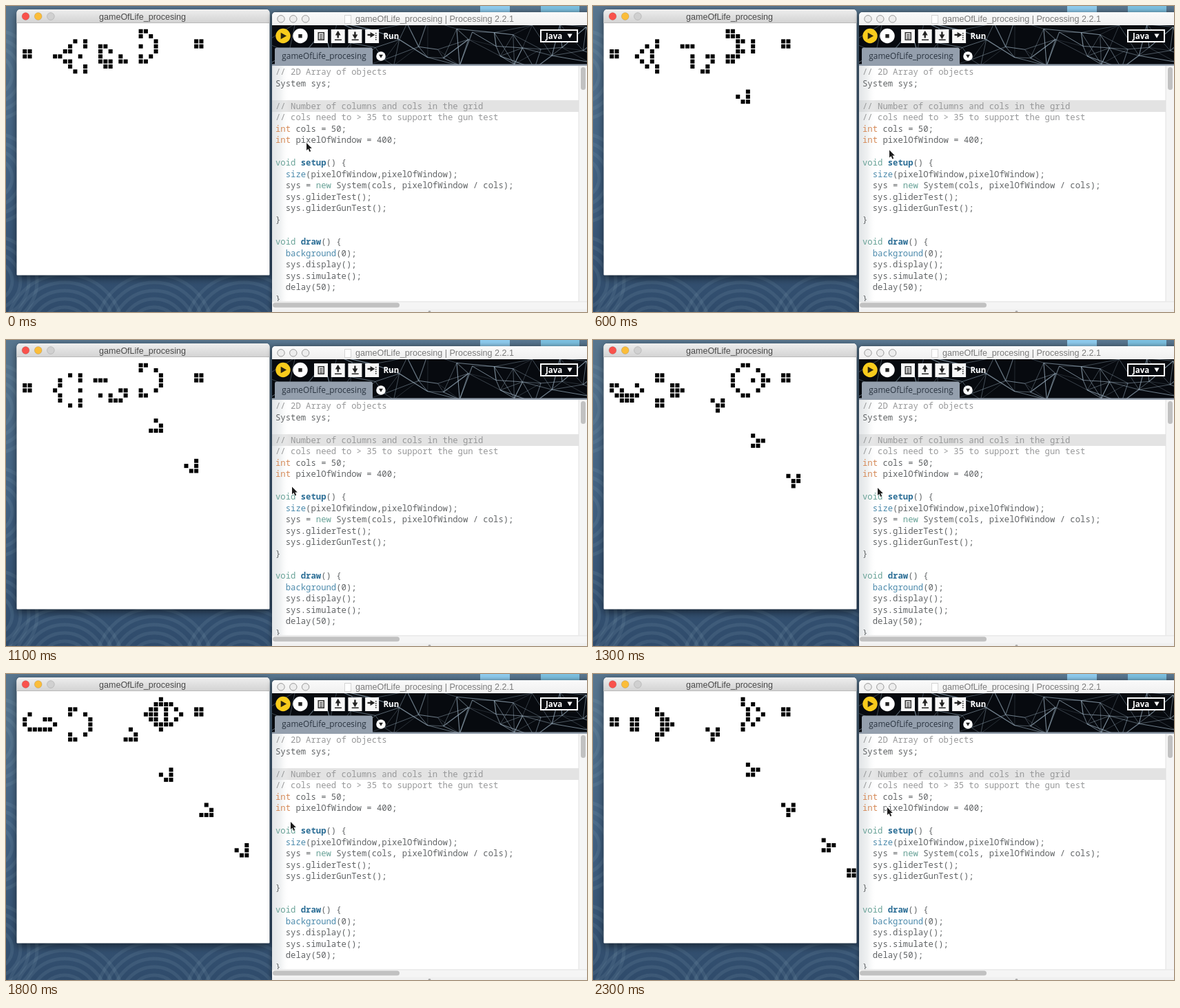
These frames come from a looping animation (843 by 445 pixels, 2.4 s). An HTML page with a canvas:

```html
<!DOCTYPE html>
<html lang="en">
<head>
<meta charset="utf-8">
<title>gameOfLife_procesing</title>
<style>
html, body { margin: 0; width: 100%; height: 100%; overflow: hidden; background: #35557a; }
canvas { display: block; }
</style>
</head>
<body>
<canvas id="stage" width="843" height="445"></canvas>
<script>
const W = 843, H = 445, STEP = 100, STEPS = 24;
const stage = document.getElementById('stage').getContext('2d');
const SANS = '"Liberation Sans", Arial, sans-serif';
const UI = '"Open Sans", "Noto Sans", sans-serif';
const MONO = '"Noto Sans Mono", "DejaVu Sans Mono", monospace';

// ---------- Game of Life ----------
// 50 x 50 cells inside a border that stays dead
const N = 52, CELL = 366 / 50, LEFT = 16, TOP = 25.5;
// Gosper glider gun, run-length encoded
const GUN = '24bo$22bobo$12b2o6b2o12b2o$11bo3bo4b2o12b2o$2o8bo5bo3b2o$' +
  '2o8bo3bob2o4bobo$10bo5bo7bo$11bo3bo$12b2o!';

function decode(rle, left, top) {
  const grid = new Uint8Array(N * N);
  let c = left, r = top;
  for (const [, count, mark] of rle.matchAll(/(\d*)([bo$])/g)) {
    const n = Number(count || 1);
    if (mark === '$') { r += n; c = left; continue; }
    if (mark === 'o') grid.fill(1, r * N + c, r * N + c + n);
    c += n;
  }
  return grid;
}

function evolve(grid) {
  const next = new Uint8Array(N * N);
  for (let r = 1; r < N - 1; r++) {
    for (let c = 1; c < N - 1; c++) {
      const i = r * N + c;
      let n = -grid[i];
      for (let d = -1; d <= 1; d++) {
        n += grid[i + d - N] + grid[i + d] + grid[i + d + N];
      }
      next[i] = n === 3 || (n === 2 && grid[i]) ? 1 : 0;
    }
  }
  return next;
}

// a steady run with a slight wobble in speed
const generation = step => Math.round(7.4 + 5.6 * step + 0.35 * Math.sin(step * 0.436));

function buildSteps() {
  let grid = decode(GUN, 2, 2), gen = 0;
  return Array.from({ length: STEPS }, (_, s) => {
    for (; gen < generation(s); gen++) grid = evolve(grid);
    return grid;
  });
}

// ---------- drawing helpers ----------
const back = document.createElement('canvas');
back.width = W;
back.height = H;
const g = back.getContext('2d');

function box(x, y, w, h, fill) {
  g.fillStyle = fill;
  g.fillRect(x, y, w, h);
}
function fade(x0, y0, x1, y1, ...stops) {
  const f = g.createLinearGradient(x0, y0, x1, y1);
  stops.forEach((c, i) => f.addColorStop(i / (stops.length - 1), c));
  return f;
}
function rounded(x, y, w, h, radii, fill) {
  g.beginPath();
  g.roundRect(x, y, w, h, radii);
  g.fillStyle = fill;
  g.fill();
}
function disc(x, y, r, fill, line) {
  g.beginPath();
  g.arc(x, y, r, 0, Math.PI * 2);
  g.fillStyle = fill;
  g.fill();
  if (line) {
    g.strokeStyle = line;
    g.lineWidth = 1;
    g.stroke();
  }
}
function triangle(x, y, size, turn, fill) {
  g.beginPath();
  for (let k = 0; k < 3; k++) {
    const a = turn + k * Math.PI * 2 / 3;
    g.lineTo(x + size * Math.cos(a), y + size * Math.sin(a));
  }
  g.fillStyle = fill;
  g.fill();
}
function text(str, x, y, font, fill, align = 'left') {
  g.font = font;
  g.fillStyle = fill;
  g.textAlign = align;
  g.fillText(str, x, y);
}
function seeded(seed) {
  return () => (seed = (seed * 16807) % 2147483647) / 2147483647;
}

// ---------- scene ----------
const DOWN = Math.PI / 2, UP = -DOWN, RIGHT = 0;

function ripples(x, y, size) {
  g.lineWidth = 5;
  g.strokeStyle = 'rgba(150,175,195,0.13)';
  for (let r = size; r > 8; r -= 12) {
    g.beginPath();
    g.arc(x, y, r, 0, Math.PI * 2);
    g.stroke();
  }
}

function drawDesktop() {
  box(0, 0, W, H, fade(0, 0, 0, H, '#58768f', '#426283', '#2f4b6b'));
  for (let k = 0; k < 3; k++) {
    ripples(85 + k * 130, 475, 85);
    ripples(-20, 100 + k * 150, 65);
  }
  box(688, 0, 43, 9, '#8ecbee');
  box(776, 0, 56, 9, '#7cc0e0');
}

function drawSketchWindow() {
  g.save();
  g.shadowColor = 'rgba(0,0,0,0.55)';
  g.shadowBlur = 12;
  g.shadowOffsetY = 4;
  rounded(15.5, 5, 367, 386.5, [5, 5, 1, 1], '#fff');
  g.restore();
  rounded(15.5, 5, 367, 20, [5, 5, 0, 0], fade(0, 5, 0, 25, '#eeeeee', '#d2d2d2'));
  box(15.5, 24, 367, 1, '#b9b9b9');
  ['#f9524c', '#fbbd3a', '#d0d0d0'].forEach((c, i) => disc(28.5 + i * 18.2, 15, 5.4, c, 'rgba(0,0,0,0.12)'));
  text('gameOfLife_procesing', 198, 19.5, '12.5px ' + SANS, '#4a4a4a', 'center');
}

function drawMesh() {
  const rnd = seeded(77), nodes = [];
  for (let x = 370; x < 870; x += 32) {
    for (let y = 20; y < 90; y += 26) nodes.push([x + rnd() * 28, y + rnd() * 22]);
  }
  g.save();
  g.beginPath();
  g.rect(386, 28, 457, 57);
  g.clip();
  nodes.forEach(([x, y], i) => nodes.slice(i + 1).forEach(([u, v]) => {
    if (Math.hypot(x - u, y - v) > 56 || rnd() < 0.35) return;
    g.beginPath();
    g.moveTo(x, y);
    g.lineTo(u, v);
    g.lineWidth = 0.6 + rnd() * 0.7;
    g.strokeStyle = `rgba(165,186,202,${0.25 + rnd() * 0.5})`;
    g.stroke();
  }));
  g.restore();
}

function arrowIcon(x, turn) {
  const reach = 4.5;
  triangle(x + reach * Math.cos(turn) * 0.4, 42 + reach * Math.sin(turn) * 0.4, 4.5, turn, '#222');
  g.beginPath();
  g.moveTo(x, 42);
  g.lineTo(x - reach * Math.cos(turn), 42 - reach * Math.sin(turn));
  g.strokeStyle = '#222';
  g.lineWidth = 2.4;
  g.stroke();
}

function drawToolbar() {
  box(386, 28, 457, 58, '#070a0f');
  drawMesh();
  disc(402, 43.5, 10.7, '#f8cb1c');
  triangle(401.5, 43.5, 5.6, RIGHT, '#2b2410');
  disc(427, 43.5, 10.7, '#fff');
  box(424.3, 41, 5.4, 5.4, '#222');
  for (let i = 0; i < 4; i++) box(447 + i * 24.7, 34, 20, 20, '#f7f7f7');
  box(452.5, 38, 9.5, 12, '#333');
  box(454, 39.5, 6.5, 9, '#f7f7f7');
  for (let y = 41; y < 48; y += 2) box(455, y, 4.5, 1, '#333');
  arrowIcon(481.7, UP);
  arrowIcon(506.4, DOWN);
  arrowIcon(529, RIGHT);
  for (const x of [477, 501.7]) box(x, 48.5, 10, 1.5, '#222');
  for (let y = 39; y < 50; y += 3) box(536, y, 1.5, 1.5, '#222');
  text('Run', 547.5, 47.5, 'bold 11.5px ' + UI, '#fff');

  box(775, 34, 55, 19, '#fff');
  box(777, 36, 51, 15, '#070a0f');
  text('Java', 783, 47.5, 'bold 11.5px ' + UI, '#fff');
  triangle(818, 42.5, 4.2, DOWN, '#fff');

  rounded(390, 60.5, 142, 26, [3, 3, 0, 0], '#949fad');
  box(386, 84.5, 457, 2.5, '#949fad');
  text('gameOfLife_procesing', 461.5, 77, '11.8px ' + UI, '#2a3440', 'center');
  disc(544, 73, 6.8, '#fff');
  triangle(544, 72.4, 3.4, DOWN, '#222');
}

const INK = '#616466', GREY = '#979899', TYPE = '#d58a58', TEAL = '#68a297',
  HEAD = '#2a6d95', CALL = '#4a89ab';
const CODE = [
  [['// 2D Array of objects', GREY]],
  [['System sys;']],
  [],
  [['// Number of columns and cols in the grid', GREY]],
  [['// cols need to > 35 to support the gun test', GREY]],
  [['int', TYPE], [' cols = 50;']],
  [['int', TYPE], [' pixelOfWindow = 400;']],
  [],
  [['void ', TEAL], ['setup', HEAD, 'bold '], ['() {']],
  [['  size', CALL], ['(pixelOfWindow,pixelOfWindow);']],
  [['  sys = '], ['new', TEAL], [' System(cols, pixelOfWindow / cols);']],
  [['  sys.gliderTest();']],
  [['  sys.gliderGunTest();']],
  [['}']],
  [],
  [['void ', TEAL], ['draw', HEAD, 'bold '], ['() {']],
  [['  background', CALL], ['(0);']],
  [['  sys.display();']],
  [['  sys.simulate();']],
  [['  delay(50);']],
  [['}']]
];

function drawCode() {
  g.save();
  g.beginPath();
  g.rect(386, 87, 445, 343);
  g.clip();
  CODE.forEach((line, i) => {
    let x = 391;
    for (const [str, fill = INK, weight = ''] of line) {
      text(str, x, 100.4 + i * 16.47, weight + '12.25px ' + MONO, fill);
      x += g.measureText(str).width;
    }
  });
  g.restore();
}

function drawEditor() {
  g.save();
  g.shadowColor = 'rgba(0,0,0,0.5)';
  g.shadowBlur = 7;
  rounded(386, 9, 470, 440, [5, 0, 0, 0], '#fff');
  g.restore();
  rounded(386, 9, 470, 19, [5, 0, 0, 0], fade(0, 9, 0, 28, '#fafafa', '#f0f0f0'));
  for (let i = 0; i < 3; i++) disc(399 + i * 17.8, 18.8, 5.2, '#ededed', '#999');
  box(491, 13, 10, 13, '#d4d4d4');
  box(492, 14, 8, 11, '#fff');
  text('gameOfLife_procesing | Processing 2.2.1', 507, 23, '12.55px ' + SANS, '#7c7c7c');
  drawToolbar();

  box(386, 87, 457, 358, '#fff');
  box(386, 137, 445, 17, '#e3e3e3');
  box(386, 87, 25, 343, fade(386, 0, 411, 0, 'rgba(200,206,210,0.55)', 'rgba(222,226,228,0.45)', 'rgba(255,255,255,0)'));
  drawCode();

  box(831, 87, 12, 343, '#f5f5f5');
  box(830.5, 87, 1, 343, '#e2e2e2');
  rounded(834, 89, 7, 33, 3.5, '#c1c1c1');
  box(386, 429.5, 457, 11, '#f5f5f5');
  box(386, 429.5, 457, 1, '#e4e4e4');
  rounded(387, 431.5, 184, 7, 3.5, '#c1c1c1');
  box(386, 440.5, 457, 5, '#f0f0f0');
  disc(614.5, 445, 2, '#aaa');
}

// ---------- animation ----------
// pointer stops: step, x, y
const POINTER = [[0, 436, 199], [4, 442, 208], [8, 418, 211], [13, 413, 215], [18, 413, 215], [21, 280, 122], [23, 427, 194]];
const SHAPE = new Path2D('M0 0V11L2.5 8.7 4.4 13 6.2 12.2 4.4 8H7.8Z');

function pointerAt(step) {
  const k = Math.max(1, POINTER.findIndex(p => p[0] >= step));
  const [s, x, y] = POINTER[k - 1], [e, u, v] = POINTER[k];
  const f = (step - s) / (e - s);
  return [x + (u - x) * f, y + (v - y) * f];
}

function drawPointer(x, y) {
  stage.save();
  stage.translate(x, y);
  stage.lineWidth = 1.4;
  stage.strokeStyle = '#fff';
  stage.stroke(SHAPE);
  stage.fillStyle = '#1c1c1c';
  stage.fill(SHAPE);
  stage.restore();
}

drawDesktop();
drawSketchWindow();
drawEditor();
const steps = buildSteps();
const start = performance.now();

function render() {
  const t = Math.max(0, performance.now() - start);
  const s = Math.floor(t / STEP) % STEPS;
  stage.drawImage(back, 0, 0);
  stage.fillStyle = '#000';
  steps[s].forEach((on, i) => {
    if (!on) return;
    const c = i % N - 1, r = Math.floor(i / N) - 1;
    stage.fillRect(LEFT + c * CELL + 0.9, TOP + r * CELL + 0.9, 6, 6);
  });
  drawPointer(...pointerAt(s));
  requestAnimationFrame(render);
}
render();
</script>
</body>
</html>
```
